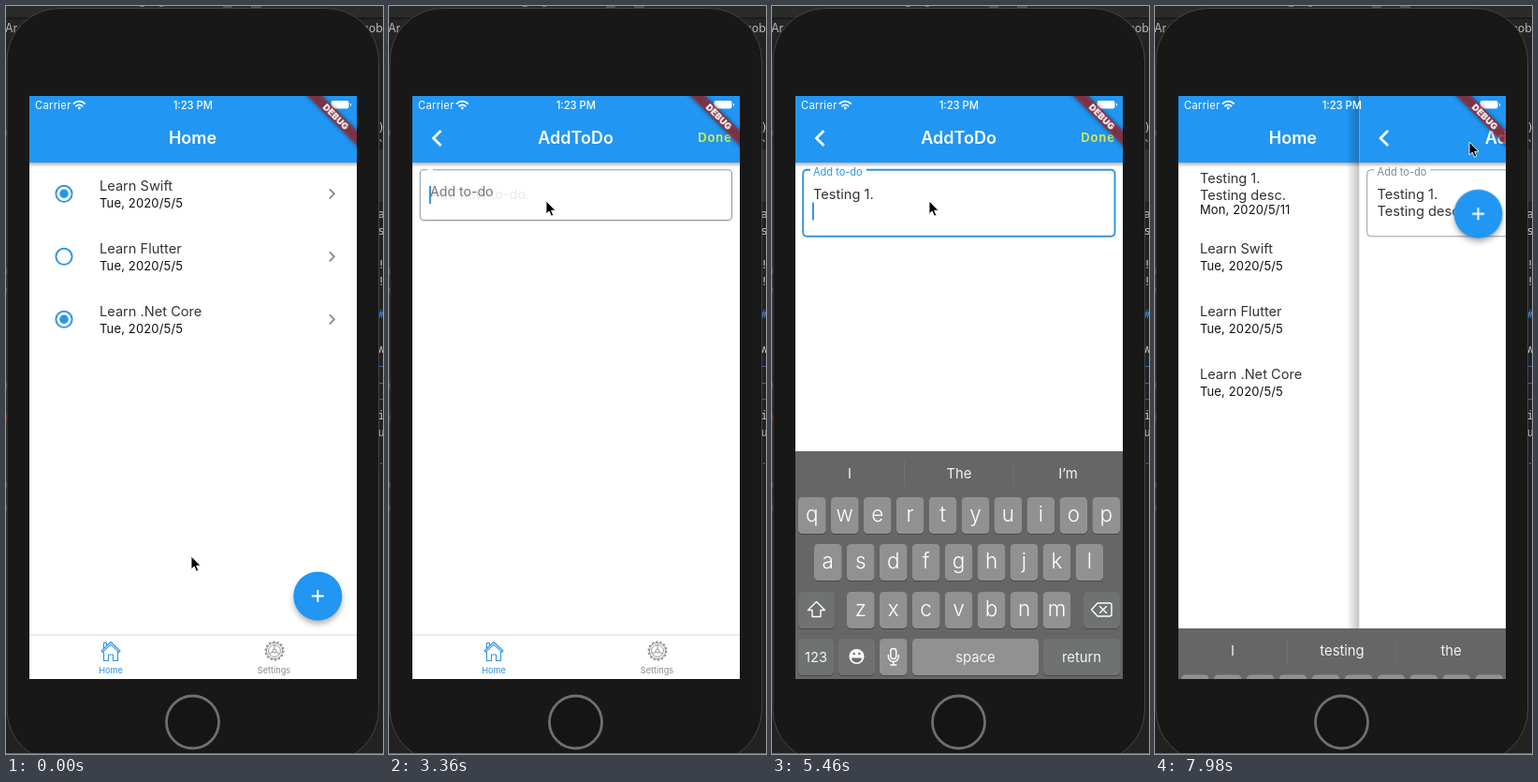
Write an HTML page that moves like this. It is 403 px wide and 798 px high and loops after 8000 ms.

```html
<!DOCTYPE html>
<html lang="en">
<head>
<meta charset="utf-8">
<title>To-do app</title>
<style>
html, body { margin: 0; width: 100%; height: 100%; overflow: hidden; background: #222; }
svg { display: block; width: 403px; height: 798px; }
text { font-family: Inter, "Open Sans", sans-serif; white-space: pre; }
.mono text { font: 12px "DejaVu Sans Mono", monospace; fill: #b5b5b5; }
.mid { text-anchor: middle; }
.bar { font-size: 18px; font-weight: 600; fill: #fff; text-anchor: middle; }
.status { font-size: 11.2px; fill: #fff; }
.body { font-size: 14.6px; fill: #333; }
.date { font-size: 13px; fill: #111; letter-spacing: .15px; }
.tab { font-size: 9.2px; text-anchor: middle; }
.letter { font-size: 22.5px; font-weight: 300; fill: #fff; text-anchor: middle; }
.word { font-size: 14.8px; fill: #f4f4f4; text-anchor: middle; }
.line { fill: none; stroke-linecap: round; stroke-linejoin: round; }

.anim { animation: 8s linear infinite; }
#home { animation-name: home; }
#add { animation-name: add; }
#list { animation: list 8s step-end infinite; }
#fresh { animation: fresh 8s step-end infinite; }
#fab { animation: fab 8s linear infinite, fabShow 8s step-end infinite; }
#done { animation: done 8s linear infinite, doneShow 8s step-end infinite; }
#keyboard { animation-name: keyboard; }
#pointer { animation-name: pointer; }
#outline { animation-name: outline; }
#gap { animation-name: gap; transform-origin: 41px 0; }
#label { animation-name: label; }
#hint { animation-name: hint; }

@keyframes home {
  0%, 26.625% { transform: translateX(0); animation-timing-function: cubic-bezier(.35,.91,.33,.97); }
  31.625%, 98.68% { transform: translateX(-116.7px); animation-timing-function: cubic-bezier(.439,.463,.723,.78); }
  100% { transform: translateX(-40.3px); }
}
@keyframes add {
  0%, 26.625% { transform: translateX(365px); }
  26.63% { transform: translateX(350px); animation-timing-function: cubic-bezier(.35,.91,.33,.97); }
  31.625%, 98.68% { transform: translateX(0); animation-timing-function: cubic-bezier(.439,.463,.723,.78); }
  100% { transform: translateX(229px); }
}
@keyframes list { 0% { transform: translateY(0); } 50%, 100% { transform: translateY(67px); } }
@keyframes fresh { 0% { opacity: 0; } 50%, 100% { opacity: 1; } }
@keyframes fab {
  0%, 26.625% { transform: translate(0, 0); }
  98.68% { transform: translate(14.7px, -489.5px); animation-timing-function: cubic-bezier(.522,0,.77,.435); }
  100% { transform: translate(10.6px, -354.5px); }
}
@keyframes fabShow { 0% { opacity: 1; } 26.625% { opacity: 0; } 98.68%, 100% { opacity: 1; } }
@keyframes done {
  0%, 26.625% { transform: translate(-15px, 489px); animation-timing-function: cubic-bezier(.4,0,.2,1); }
  31.625%, 100% { transform: translate(0, 0); }
}
@keyframes doneShow { 0% { opacity: 0; } 26.625% { opacity: 1; } 98.68%, 100% { opacity: 0; } }
@keyframes keyboard {
  0%, 42.33% { transform: translateY(243px); animation-timing-function: cubic-bezier(.2,.4,.25,1); }
  45.33%, 98.5% { transform: translateY(0); animation-timing-function: cubic-bezier(.25,.25,.6,.85); }
  100% { transform: translateY(206.5px); }
}
@keyframes pointer {
  0%, 5% { transform: translate(198px, 587px); animation-timing-function: ease-in-out; }
  18.75%, 32.5% { transform: translate(330px, 631px); animation-timing-function: ease-in-out; }
  40%, 87% { transform: translate(168px, 208px); animation-timing-function: ease-in-out; }
  96%, 100% { transform: translate(336px, 145px); }
}
@keyframes outline {
  0%, 41.8% { stroke: #9a9a9a; stroke-width: 1px; }
  43.75%, 98.4% { stroke: #2f93e0; stroke-width: 1.9px; }
  99.6%, 100% { stroke: #9a9a9a; stroke-width: 1px; }
}
@keyframes gap {
  0%, 41.5625% { transform: scaleX(0); animation-timing-function: cubic-bezier(.4,0,.2,1); }
  44.0625%, 100% { transform: scaleX(1); }
}
@keyframes label {
  0%, 41.5625% { transform: translate(44px, 206px) scale(1); fill: #757575; animation-timing-function: cubic-bezier(.4,0,.2,1); }
  44.0625%, 98.4% { transform: translate(44px, 181px) scale(.76); fill: #2f93e0; }
  99.6%, 100% { transform: translate(44px, 181px) scale(.76); fill: #858585; }
}
@keyframes hint { 0%, 41.5625% { opacity: 0; } 44.0625%, 100% { opacity: 1; } }
</style>
</head>
<body>
<svg viewBox="0 0 403 798">
  <defs>
    <clipPath id="screen"><rect x="25" y="96" width="350" height="622"/></clipPath>
    <linearGradient id="drop" x2="0" y2="1">
      <stop stop-color="#000" stop-opacity=".3"/><stop offset="1" stop-color="#000" stop-opacity="0"/>
    </linearGradient>
    <linearGradient id="edge">
      <stop stop-color="#000" stop-opacity="0"/><stop offset="1" stop-color="#000" stop-opacity=".24"/>
    </linearGradient>
    <filter id="soft" x="-50%" y="-50%" width="200%" height="200%"><feGaussianBlur stdDeviation="3.5"/></filter>
    <filter id="blur" x="-50%" y="-100%" width="200%" height="300%"><feGaussianBlur stdDeviation="2.5"/></filter>
  </defs>

  <!-- desktop behind the phone -->
  <rect width="403" height="798" fill="#222"/>
  <rect width="403" height="13" fill="#2b2b2b"/>
  <rect y="13" width="403" height="21" fill="#252525"/>
  <rect y="12.5" width="403" height="1" fill="#111"/>
  <rect x="396" y="153" width="7" height="56" fill="#303030"/>
  <g id="code" class="mono">
    <text x="-1" y="28" style="font:12.5px Inter,sans-serif">Ar</text>
    <text x="403" y="28" text-anchor="end" style="font:12.5px Inter,sans-serif">cob</text>
  </g>

  <!-- phone -->
  <rect x="1" y="2.5" width="397.5" height="804" rx="56" fill="#181818" stroke="#444"/>
  <path d="M143 .5h5M164 .5h4M232 1h10M262 1h11" stroke="#777"/>
  <path d="M0 797.5h403" stroke="#6a6a6a"/>
  <circle cx="199.5" cy="764" r="28" fill="#151515" stroke="#6f6f6f" stroke-width="2.8"/>

  <g clip-path="url(#screen)">
    <g id="home" class="anim">
      <rect x="25" y="96" width="350" height="622" fill="#fff"/>
      <g id="list"></g>
      <g id="fresh">
        <circle cx="62" cy="200" r="8.6" fill="none" stroke="#2f93e8" stroke-width="1.9"/>
        <text class="body" x="100" y="189">Testing 1.</text>
        <text class="body" x="100" y="206.5">Testing desc.</text>
        <text class="date" x="100" y="222">Mon, 2020/5/11</text>
      </g>
      <rect x="25" y="167" width="350" height="5" fill="url(#drop)"/>
      <rect x="25" y="96" width="350" height="71" fill="#2196f3"/>
      <text class="bar" x="199.5" y="147">Home</text>
    </g>

    <g id="add" class="anim">
      <rect x="11" y="96" width="14" height="622" fill="url(#edge)"/>
      <rect x="25" y="96" width="350" height="622" fill="#fff"/>
      <rect x="25" y="167" width="350" height="5" fill="url(#drop)"/>
      <rect x="25" y="96" width="350" height="71" fill="#2196f3"/>
      <path d="M55.5 133l-8 8 8 8" fill="none" stroke="#fff" stroke-width="2.8"/>
      <text class="bar" x="199.5" y="147">AddToDo</text>
      <rect id="outline" class="anim" x="33.2" y="174.8" width="333.3" height="53.8" rx="4" fill="none"/>
      <rect id="gap" class="anim" x="41" y="172.5" width="60" height="5" fill="#fff"/>
      <text id="label" class="anim" font-size="14.5">Add to-do</text>
      <g id="hintBox"><text id="hint" class="anim" x="44" y="206" font-size="14.5" fill="#858585">Add new to-do.</text></g>
      <text id="line0" class="body" x="44" y="206"></text>
      <text id="line1" class="body" x="44" y="223.7"></text>
      <rect id="caret" width="1.9" height="19" fill="#2f8fdc"/>
    </g>

    <!-- tab bar -->
    <rect x="25" y="671" width="350" height="47" fill="#fff"/>
    <path d="M25 671h350" stroke="#d2d2d2"/>
    <g class="line" stroke="#2f93e8" stroke-width="1.1">
      <path d="M102 688l10-9.5 10 9.5-1.3 1.4-8.7-8.2-8.7 8.2z"/>
      <path d="M104.5 689.5v9h5v-6.5h5v6.5h5v-9M104.5 685v-5.5h3v2.8"/>
    </g>
    <text class="tab" x="112" y="712" fill="#2f93e8">Home</text>
    <g fill="none" stroke="#8b8b8b" stroke-width=".9">
      <circle cx="287" cy="688" r="9.6" stroke-width="1.7" stroke-dasharray="2.2 2.11"/>
      <circle cx="287" cy="688" r="8.6"/>
      <circle cx="287" cy="688" r="6.4"/>
      <circle cx="287" cy="688" r="2"/>
      <path d="M287 686v-4.4M288.7 689l3.8 2.2M285.3 689l-3.8 2.2"/>
    </g>
    <text class="tab" x="286.5" y="712" fill="#8b8b8b">Settings</text>

    <g id="done"><text class="mid" x="348.5" y="145" font-size="13" font-weight="600" letter-spacing=".93" fill="#e3ee42">Done</text></g>
    <g id="fab">
      <circle cx="333.3" cy="633.5" r="25" filter="url(#soft)" opacity=".38"/>
      <circle cx="333.3" cy="629.5" r="26" fill="#2196f3"/>
      <path d="M326.8 629.5h13M333.3 623v13" stroke="#fff" stroke-width="1.9"/>
    </g>

    <!-- status bar -->
    <text class="status" x="31" y="109.5" letter-spacing=".3">Carrier</text>
    <g class="line" stroke="#fff" stroke-width="1.9">
      <path d="M72.5 104a8.3 8.3 0 0 1 11.6 0M75 106.7a4.8 4.8 0 0 1 6.6 0"/>
      <circle cx="78.3" cy="109" r=".5"/>
    </g>
    <text class="status mid" x="199.8" y="109.5" font-weight="500">1:23 PM</text>
    <rect x="347.5" y="101" width="19" height="8.5" rx="2.3" fill="#fff"/>
    <path d="M368.5 104v2.5" stroke="#fff"/>
    <g transform="translate(375 96) rotate(45)">
      <rect x="-45" y="26.1" width="90" height="11.2" filter="url(#blur)" opacity=".45"/>
      <rect x="-45" y="26.1" width="90" height="11.2" fill="#b71c1c" opacity=".63"/>
      <text class="mid" y="35.2" font-size="9.6" font-weight="900" fill="#fff" letter-spacing=".2">DEBUG</text>
    </g>

    <g id="keyboard" class="anim">
      <rect x="25" y="475" width="350" height="243" fill="#666"/>
      <path id="dividers" d="M141.5 485v27M258 485v27" stroke="#727272"/>
      <text class="word" x="83" y="504"></text>
      <text class="word" x="200" y="504"></text>
      <text class="word" x="316.5" y="504"></text>
      <g id="keys"></g>
      <g class="line" stroke="#fff" stroke-width="1.4">
        <path d="M47.5 635.5l9 9h-4.5v7h-9v-7h-4.5z"/>
        <path d="M348 637h13a2 2 0 0 1 2 2v10a2 2 0 0 1-2 2h-13l-6.5-7zM350.5 640.5l7 7M357.5 640.5l-7 7"/>
        <rect x="126.8" y="685.5" width="6" height="11" rx="3"/>
        <path d="M124.3 692.5v1.5a5.5 5.5 0 0 0 11 0v-1.5M129.8 699.5v3.5M126.8 703h6"/>
      </g>
      <circle cx="90.5" cy="694" r="8" fill="#fff"/>
      <path d="M85 695.5h11a5.5 5 0 0 1-11 0z" fill="#6b6e6d"/>
      <circle cx="87.7" cy="691" r="1.3" fill="#6b6e6d"/>
      <circle cx="93.3" cy="691" r="1.3" fill="#6b6e6d"/>
    </g>
  </g>

  <g id="pointer" class="anim">
    <path d="M0 0v14l3.2-3 2.3 5.2 2.3-1-2.2-5h4.4z" fill="#000" stroke="#fff" stroke-width=".9" stroke-linejoin="round"/>
  </g>
</svg>

<script>
const $ = id => document.getElementById(id);

// Code peeking out beside the phone
const scraps = [
  [')', 134], ['`', 153], ['a', 226], ['s', 244], ['!', 280], ['!', 298],
  ['#', 333, '#3d86d8'], ['W', 370], ['–', 388, '#3d6fb0'], ['–', 406, '#3d6fb0'],
  ['–', 423, '#3d6fb0'], ['i', 441], ['u', 459], ['.', 489, '#3d6fb0']
];
$('code').innerHTML += scraps.map(([ch, y, fill = '#c4c4c4']) =>
  `<text x="397.5" y="${y}" style="fill:${fill}">${ch}</text>`).join('') +
  [132, 280, 300, 402, 508, 533].map(y => `<rect y="${y}" width="1" height="6" fill="#666"/>`).join('') +
  '<rect y="436" width="1" height="7" fill="#a33"/>';

// To-do rows
$('list').innerHTML = ['Learn Swift', 'Learn Flutter', 'Learn .Net Core'].map((name, i) => `
  <g transform="translate(0 ${i * 67})">
    <circle cx="62" cy="200.3" r="8.6" fill="none" stroke="#2f93e8" stroke-width="1.9"/>
    ${i === 1 ? '' : '<circle cx="62" cy="200.3" r="4.7" fill="#2196f3"/>'}
    <text class="body" x="100" y="196.7">${name}</text>
    <text class="date" x="100" y="215">Tue, 2020/5/5</text>
    <path d="M345.8 195.3l5 5-5 5" fill="none" stroke="#868686" stroke-width="1.8"/>
  </g>`).join('');

// Keyboard
const key = (x, y, w, text = '', fill = '#919191', style = 'letter') => `
  <rect x="${x}" y="${y + 1}" width="${w}" height="39" rx="4.5" fill="#474747"/>
  <rect x="${x}" y="${y}" width="${w}" height="39" rx="4.5" fill="${fill}"/>
  <text class="${style}" x="${x + w / 2}" y="${y + (style === 'letter' ? 26 : 24.5)}">${text}</text>`;
const keyRow = (letters, x, y) =>
  [...letters].map((ch, i) => key(x + i * 34.95, y, 29.5, ch)).join('');
const dark = '#6f7271';
$('keys').innerHTML =
  keyRow('qwertyuiop', 28, 524) + keyRow('asdfghjkl', 45, 574) + keyRow('zxcvbnm', 80, 625) +
  key(28, 625, 39.5, '', dark) + key(333, 625, 39, '', dark) +
  key(28, 675, 38, '123', dark, 'word') + key(71, 675, 39, '', dark) + key(115, 675, 29.5) +
  key(150, 675, 135, 'space', '#919191', 'word') + key(290, 675, 82, 'return', dark, 'word');

// Typing
const type = (text, start, gap) => [...text].map((ch, i) => [start + i * gap, ch]);
const strokes = [
  ...type('Testing ', 3760, 95), [4720, '1'], [4960, '.'], [5330, '\n'],
  ...type('Testing desc', 5550, 85), [6700, '.']
];
const guesses = [
  [0, '||'], [3620, 'I|The|I’m'], [3900, '“Te”|Test|Text'], [4150, '“Testi”|Testing|Testify'],
  [4470, 'the|out|my'], [4760, '“1”|1st|10'], [5000, 'I|The|I’m'], [5700, '“Te”|Test|Text'],
  [5930, '“Testi”|Testing|Testify'], [6180, 'the|out|my'], [6330, '“de”|desc|definitely'],
  [6560, '“desc”|describe|description'], [6740, 'I|testing|the']
];
const words = document.querySelectorAll('#keyboard > .word');
const focusAt = 3325, blurAt = 7880;
const clock = $('pointer').getAnimations()[0];
const show = (id, on) => { $(id).style.display = on ? '' : 'none'; };

function draw() {
  const t = (clock.currentTime || 0) % 8000;
  const typed = strokes.filter(s => s[0] <= t);
  const lines = typed.map(s => s[1]).join('').split('\n');
  const last = lines.length - 1;
  $('line0').textContent = lines[0];
  $('line1').textContent = lines[1] || '';
  $('outline').setAttribute('height', last ? 71 : 53.8);
  show('hintBox', !typed.length);

  const edited = typed.length ? typed[typed.length - 1][0] : focusAt;
  const width = lines[last] ? $('line' + last).getComputedTextLength() : -1;
  $('caret').setAttribute('x', 44 + width);
  $('caret').setAttribute('y', 192 + last * 17.5);
  show('caret', t >= focusAt && t < blurAt && (t - edited) % 1000 < 500);

  const guess = guesses.filter(g => g[0] <= t).pop()[1].split('|');
  words.forEach((el, i) => { el.textContent = guess[i]; });
  show('dividers', guess[0]);
  requestAnimationFrame(draw);
}
draw();
</script>
</body>
</html>
```
